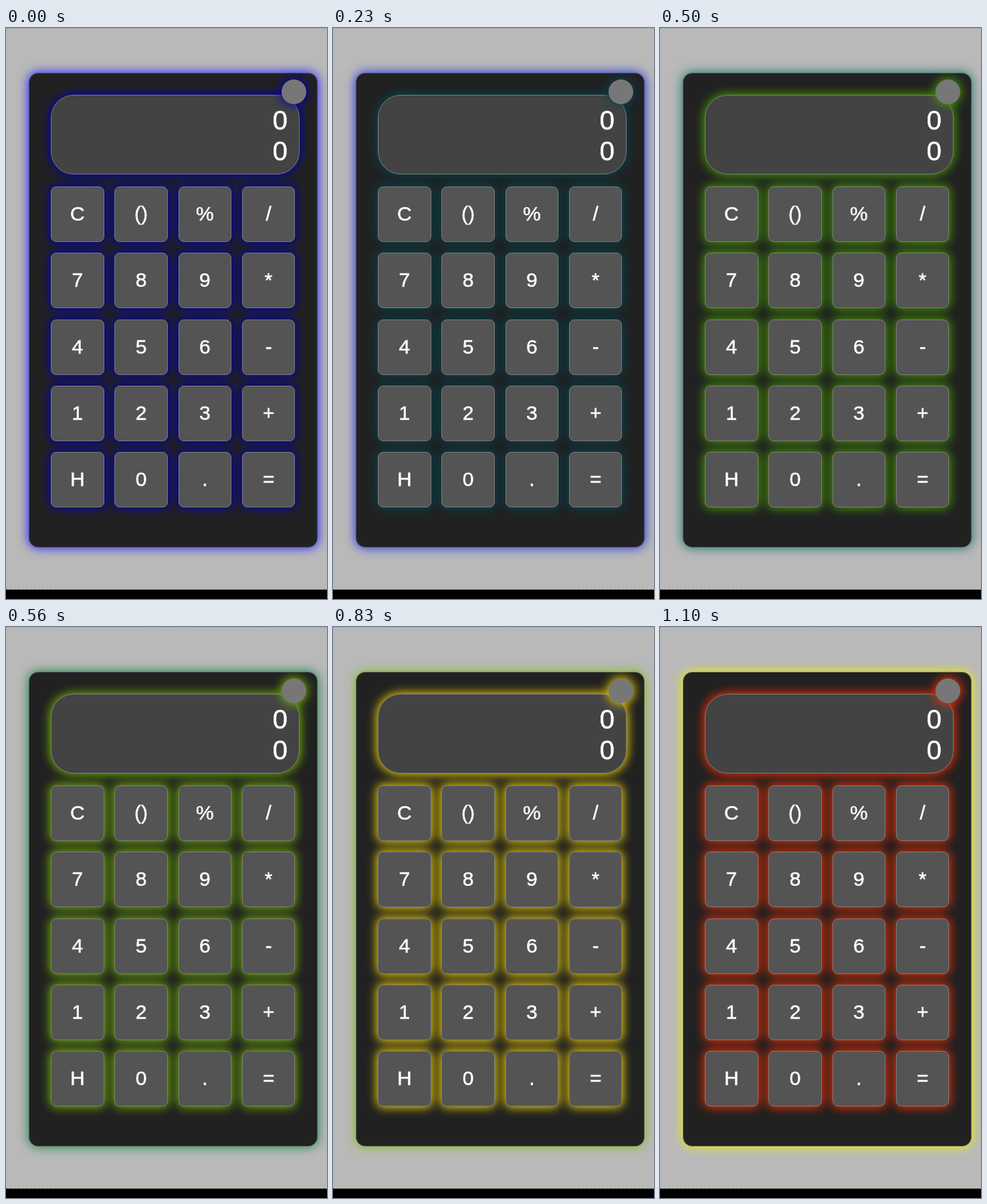
Animation, 480 px wide and 854 px high, one loop 1.16 s. Source, as an HTML page:

```html
<!DOCTYPE html>
<html lang="en">
<head>
<meta charset="utf-8">
<title>Calculator</title>
<style>
  @property --inner { syntax: "<color>"; inherits: true; initial-value: blue; }
  @property --outer { syntax: "<color>"; inherits: true; initial-value: blue; }

  @keyframes inner {
    0%, 3% { --inner: #0000b8; }
    33% { --inner: green; }
    66% { --inner: yellow; }
    80% { --inner: orange; }
    100% { --inner: red; }
  }
  @keyframes outer {
    0%, 13% { --outer: #2a2aff; }
    52% { --outer: #289040; }
    92%, 100% { --outer: #e8ec10; }
  }

  * { box-sizing: border-box; }
  html, body { margin: 0; width: 100%; height: 100%; overflow: hidden; background: #000; }
  .stage {
    position: relative; width: 480px; height: 854px; overflow: hidden;
    font: 30px "Liberation Sans", Arial, sans-serif; color: #fff;
    -webkit-text-stroke: .5px #fff;
    animation: inner 1160ms linear paused, outer 1160ms linear paused;
    animation-delay: calc(var(--time, 0) * -1ms);
  }
  .page { position: absolute; inset: 0 0 14px; background: #b9b9b9; }
  .page::before, .page::after {
    content: ""; position: absolute; left: 0; width: 100%; height: 1px;
    background: repeating-linear-gradient(90deg, #979797 0 3px, #b5b5b5 3px 6px);
  }
  .page::before { top: 0; }
  .page::after { bottom: 0; }

  .device { position: absolute; inset: 0; filter: blur(.5px); }
  .case {
    position: absolute; left: 34px; top: 67px; width: 431.5px; height: 710px;
    border: 1px solid color-mix(in srgb, var(--outer) 25%, #555);
    border-radius: 14px; background: #212121;
    box-shadow: 0 0 15px 1px var(--outer);
  }
  .screen, .key, .knob { position: absolute; box-shadow: 0 0 15px 1px var(--inner); }
  .screen, .key { border: 1px solid #7c7c7c; }
  .screen {
    left: 67px; top: 100px; width: 371.5px; height: 119px;
    padding: 13.5px 16.5px 0; border-radius: 34px; background: #434343;
    font-size: 40px; line-height: 46px; text-align: right;
  }
  .key {
    width: 79.5px; height: 83px; border-radius: 8px; background: #545454;
    line-height: 79px; text-align: center;
  }
  .knob {
    left: 411.5px; top: 76.5px; width: 37px; height: 37px;
    border-radius: 50%; background: #777;
  }
</style>
</head>
<body>
<div class="stage" id="stage">
  <div class="page"></div>
  <div class="device" id="device">
    <div class="case"></div>
    <div class="screen"><div>0</div><div>0</div></div>
    <div class="knob"></div>
  </div>
</div>
<script>
  const LOOP = 1160;
  const RATE = 15 / 1000;
  const LAG = 26;
  const stage = document.getElementById('stage');
  const device = document.getElementById('device');

  'C () % / 7 8 9 * 4 5 6 - 1 2 3 + H 0 . ='.split(' ').forEach((label, i) => {
    const key = document.createElement('div');
    key.className = 'key';
    key.textContent = label;
    key.style.left = 67 + (i % 4) * 95.3 + 'px';
    key.style.top = 236.8 + Math.floor(i / 4) * 99.4 + 'px';
    device.append(key);
  });

  // the glow changes in steps, fifteen times a second
  function draw(now) {
    const step = Math.max(0, Math.floor((now % LOOP - LAG) * RATE));
    stage.style.setProperty('--time', step / RATE + LAG);
    requestAnimationFrame(draw);
  }
  draw(0);
</script>
</body>
</html>
```
